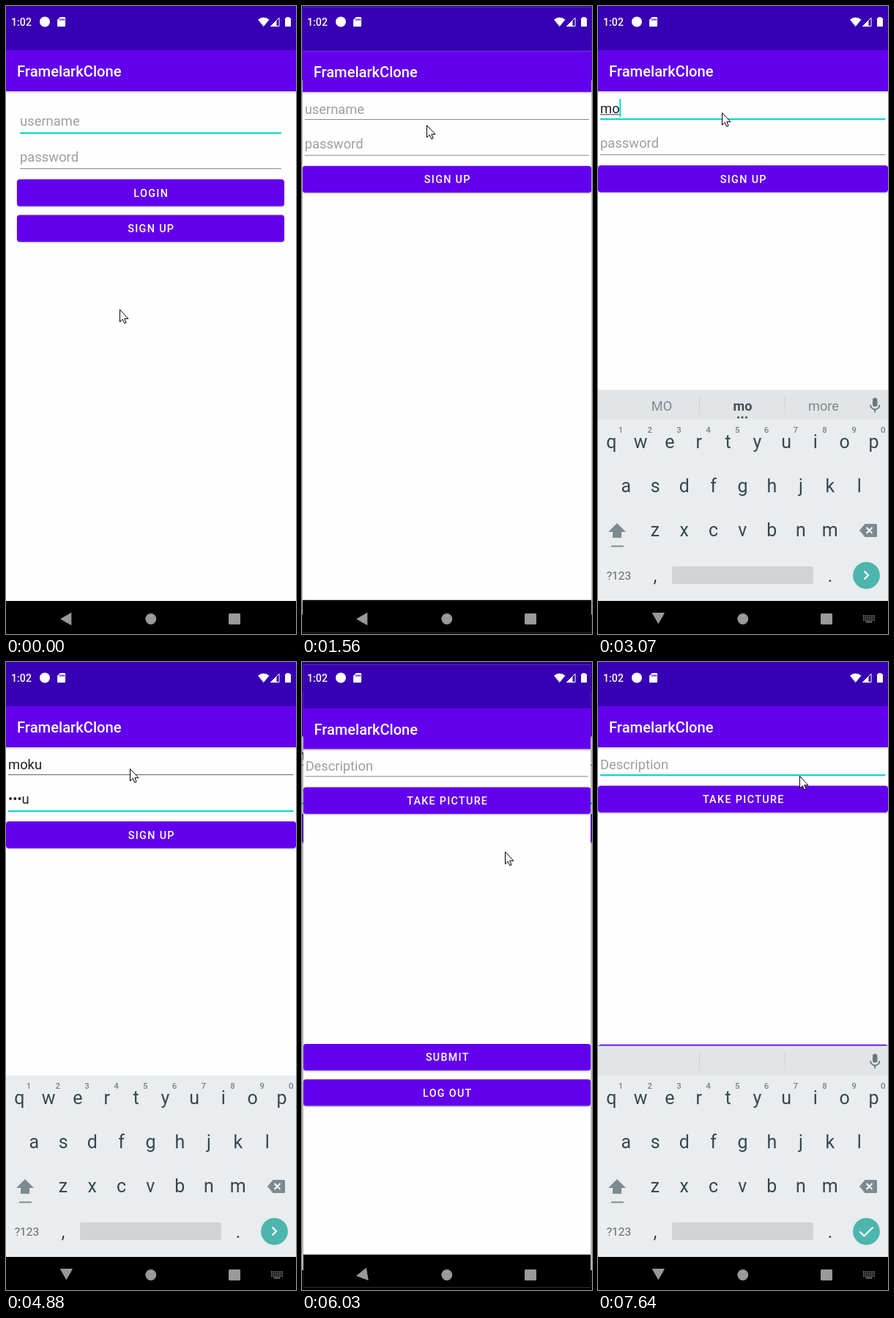
Write an HTML page with a canvas that moves like this. It is 396 by 855 pixels and loops after 8000 ms.

```html
<!DOCTYPE html>
<html lang="en">
<head>
<meta charset="utf-8">
<title>Sign up flow</title>
<style>
html, body { margin: 0; width: 100%; height: 100%; overflow: hidden; background: #000; }
canvas { display: block; }
</style>
</head>
<body>
<canvas id="stage" width="396" height="855"></canvas>
<script>
const W = 396, H = 855, LOOP = 8000;
const STEP = 127.3;   // ms between screen refreshes; all times below count these
const BLINK = 3.85;
const TEAL = '#03dac5', PURPLE = '#6200ee', INK = '#37474f', SOFT = '#75828a', NAV = '#999';
const screenCtx = document.getElementById('stage').getContext('2d');
const scratch = Object.assign(document.createElement('canvas'), { width: W, height: H }).getContext('2d');
let g = screenCtx;

const ramp = (t, start, length) => Math.min(1, Math.max(0, (t - start) / length));
const smooth = f => f * f * (3 - 2 * f);
const settle = f => 1 - (1 - f) ** 3.7;
const blink = age => Math.floor(age / BLINK) % 2 === 0;

// Each pointer move: start, end, destination.
const moves = [[2.4, 5, 178, 306], [10, 12.5, 169, 145], [38, 40, 198, 204],
  [44, 47, 277, 258], [50, 51, 235, 243], [51, 53, 275, 155]];

function pointerAt(t) {
  return moves.reduce(([x, y], [start, end, toX, toY]) => {
    const f = smooth(ramp(t, start, end - start));
    return [x + (toX - x) * f, y + (toY - y) * f];
  }, [155, 413]);
}

function typing(word, start, gap, t) {
  const count = Math.min(word.length, Math.max(0, Math.floor((t - start) / gap) + 1));
  return { value: word.slice(0, count), lastEdit: count && start + (count - 1) * gap };
}
const nameTyping = t => typing('moku', 22, 2, t);
const secretTyping = t => typing('moku', 30.6, 1.17, t);

function rect(x, y, w, h, color, r = 0) {
  g.fillStyle = color;
  g.beginPath();
  g.roundRect(x, y, w, h, r);
  g.fill();
}

function disc(x, y, r, color) {
  g.fillStyle = color;
  g.beginPath();
  g.arc(x, y, r, 0, 7);
  g.fill();
}

function shape(d, fill, stroke, width = 1) {
  const p = new Path2D(d);
  if (fill) { g.fillStyle = fill; g.fill(p); }
  if (stroke) { g.strokeStyle = stroke; g.lineWidth = width; g.stroke(p); }
}

function text(s, x, y, size, color, { weight = 400, align = 'left', spacing = 0 } = {}) {
  g.font = `${weight} ${size}px Roboto, sans-serif`;
  g.letterSpacing = spacing + 'px';
  g.textAlign = align;
  g.fillStyle = color;
  g.fillText(s, x, y);
  return g.measureText(s).width;
}

function at(x, y, draw) {
  g.save();
  g.translate(x, y);
  draw();
  g.restore();
}

// Draws as one flat layer, so overlapping parts fade together.
function group(alpha, draw) {
  if (alpha <= 0) return;
  const outer = g;
  g = scratch;
  g.clearRect(0, 0, W, H);
  draw();
  g = outer;
  g.save();
  g.globalAlpha = alpha;
  g.drawImage(scratch.canvas, 0, 0);
  g.restore();
}

function button(label, x, y, w, ripple = 0) {
  g.save();
  g.shadowColor = 'rgba(0,0,0,.3)';
  g.shadowBlur = 2;
  g.shadowOffsetY = 1.2;
  rect(x, y, w, 36.4, PURPLE, 4);
  g.restore();
  if (ripple) {
    g.save();
    g.beginPath();
    g.roundRect(x, y, w, 36.4, 4);
    g.clip();
    disc(198, y + 18, ripple * 200, 'rgba(255,255,255,.22)');
    g.restore();
  }
  text(label, x + w / 2 + .8, y + 23.5, 14.4, '#fff', { weight: 500, align: 'center', spacing: 1.32 });
}

function field(x, w, baseline, line, { hint, value = '', focus, caret, composing }) {
  const width = value && text(value, x, baseline, 18.4, '#212121');
  if (!value) text(hint, x, baseline, 18.4, '#9e9e9e');
  if (composing && value) rect(x, baseline + 1.5, width, 1, '#333');
  if (focus) rect(x, line, w, 2, TEAL);
  else rect(x, line, w, 1, value ? '#666' : '#8a8a8a');
  if (caret) rect(x + width - .3, baseline - 19.5, 2, 25, TEAL);
}

function frame(content) {
  rect(0, 0, W, H, '#fefefe');
  const fade = g.createLinearGradient(0, 116, 0, 119);
  fade.addColorStop(0, 'rgba(0,0,0,.22)');
  fade.addColorStop(1, 'rgba(0,0,0,0)');
  rect(0, 116, W, 3, fade);
  rect(0, 0, W, 60, '#3700b3');
  rect(0, 60, W, 56, PURPLE);
  text('FramelarkClone', 15, 96, 20.2, '#fff', { weight: 500 });
  content();
  rect(0, 810, W, 45, '#000');
}

function loginScreen(t) {
  frame(() => {
    field(19, 357, 163, 172, { hint: 'username', focus: true, caret: blink(t - 2) });
    field(19, 357, 211.5, 221, { hint: 'password' });
    button('LOGIN', 15, 236, 365);
    button('SIGN UP', 15, 284.5, 365, ramp(t, 8, 2));
  });
}

function signupScreen(t) {
  const inName = t >= 15 && t < 29, inSecret = t >= 29;
  const name = nameTyping(t), secret = secretTyping(t);
  frame(() => {
    field(3, 389.5, 145.8, 153, {
      hint: 'username', value: name.value, focus: inName, composing: inName,
      caret: inName && blink(t - (name.lastEdit || 15))
    });
    field(3, 389.5, 193, 202, {
      hint: 'password', value: secret.value.replace(/.(?=.)/g, '•'), focus: inSecret,
      caret: inSecret && blink(t - (secret.lastEdit || 29))
    });
    button('SIGN UP', 0, 217, W, t < 44 && ramp(t, 40, 2.5));
  });
}

function postScreen(t) {
  frame(() => {
    field(3, 389.5, 145.8, 153, { hint: 'Description', focus: t >= 55, caret: t >= 55 && blink(Math.max(0, t - 56)) });
    button('TAKE PICTURE', 0, 168.4, W);
    button('SUBMIT', 0, 520.7, W);
    button('LOG OUT', 0, 569.4, W);
  });
}

function zoomed(scale, draw) {
  g.save();
  g.translate(W / 2, H / 2);
  g.scale(scale, scale);
  g.translate(-W / 2, -H / 2);
  g.beginPath();
  g.rect(0, 0, W, H);
  g.clip();
  draw();
  g.restore();
}

function transition(p, from, to) {
  if (p < 1) {
    zoomed(1 + .05 * p, from);
    rect(0, 0, W, H, `rgba(0,0,0,${.3 * p})`);
  }
  if (p > 0) zoomed(.85 + .15 * p, to);
}

function suggestions(word) {
  rect(0, 522.5, W, 40.5, '#e1e5e8');
  for (const x of [138, 255]) rect(x, 532, 1, 24, '#cdd2d5');
  if (word) {
    const guess = ['me', 'more', 'mock', 'mocha'][word.length - 1];
    [word.toUpperCase(), word, guess].forEach((s, i) => text(s, 87 + 110.5 * i, 551, 18.2,
      i === 1 ? '#455057' : '#7d888e', { weight: i === 1 ? 700 : 400, align: 'center' }));
    for (const x of [191.5, 197, 202.5]) disc(x, 560, 1.6, '#455057');
  }
  rect(375, 533.5, 6.5, 12, '#6a767c', 3.2);
  shape('M372 543a6.2 6.2 0 0 0 12.5 0M378.2 549v4.5', null, '#6a767c', 1.8);
}

function keyboard(t) {
  const posting = t >= 46;
  rect(0, 563, W, 247, '#e9edf0');
  if (posting) suggestions('');
  else if (t < 29) suggestions(nameTyping(t).value);
  ['qwertyuiop', 'asdfghjkl', 'zxcvbnm'].forEach((row, r) => [...row].forEach((key, i) => {
    text(key, [18.3, 38.3, 78][r] + 39.8 * i, 602 + 60.2 * r, 25, INK, { align: 'center' });
    if (!r) text((i + 1) % 10, 31 + 39.8 * i, 581, 11.5, SOFT, { weight: 500, align: 'center' });
  }));
  shape('M26 704L38 716H32V724H20V716H14Z', '#7d8a90');
  rect(18, 734.5, 17, 2, '#7d8a90');
  shape('M357 714L364.5 705H379.5Q381 705 381 706.5V721.5Q381 723 379.5 723H364.5Z', '#7d8a90');
  shape('M366.5 710l8 8m0-8l-8 8', null, '#fff', 2);
  text('?123', 28.5, 781, 15.5, '#5f6b70', { align: 'center' });
  text(',', 78, 784, 25, INK, { align: 'center' });
  text('.', 317, 784, 25, INK, { align: 'center' });
  rect(101, 763, 193, 24, '#d0d4d7', 3);
  disc(366.5, 775.3, 18.4, '#4db6ac');
  shape(posting ? 'M357.5 775.5l6 6l12-12' : 'M363.5 769.5l5.5 5.5l-5.5 5.5', null, '#fff', 2.2);
}

function statusIcons() {
  text('1:02', 7, 27, 14.2, '#fff', { weight: 500 });
  disc(53, 21.5, 7, '#fff');
  shape('M74 15H80Q81 15 81 16V27Q81 28 80 28H71Q70 28 70 27V19Z', '#fff');
  for (const x of [73.5, 76, 78.5]) rect(x, 17, 1.2, 3, '#3700b3');
  shape('M351.7 28L344 18.5Q351.7 12.5 359.5 18.5Z', '#fff');
  shape('M361.5 27.5L373 16V27.5Z', null, '#fff');
  shape('M361 28L369.5 19.5V28Z', '#fff');
  rect(381, 16.3, 8, 11.7, '#fff', 1);
  rect(383, 15, 4, 2, '#fff');
}

function navIcons(turn, keyboardOpen) {
  at(82.4, 834.5 - 1.5 * turn, () => {
    g.rotate(-turn * Math.PI / 2);
    shape('M-7.5 0L6.5 -8V8Z', NAV, NAV, 1);
  });
  disc(197.8, 834.5, 7.4, NAV);
  rect(304, 827, 16, 15, NAV, 1.5);
  if (!keyboardOpen) return;
  for (let i = 0; i < 18; i++) rect(362 + i % 6 * 2.8, 829.5 + Math.floor(i / 6) * 2.8, 1.7, 1.7, '#8c8c8c');
  rect(365.5, 837.8, 9, 1.5, '#8c8c8c');
}

function draw(t) {
  if (t < 45) transition(settle(ramp(t, 10, 3.14)), () => loginScreen(t), () => signupScreen(t));
  else transition(settle(ramp(t, 45.3, 3.14)), () => signupScreen(t), () => postScreen(t));

  const shown = t < 46 ? ramp(t, 16.46, 1.54) : ramp(t, 56.46, 1.54);
  const turn = ramp(t, 17, 2) - ramp(t, 45.2, 2) + ramp(t, 57, 2);
  group(shown, () => at(0, 288 * (1 - shown), () => keyboard(t)));
  statusIcons();
  navIcons(turn, shown > 0);

  const [x, y] = pointerAt(t);
  at(Math.round(x) + .5, Math.round(y) + .5, () =>
    shape('M0 0V16.5L3.8 13L6.3 18.6L8.7 17.6L6.3 12.2H11.5Z', '#fff', '#000'));
}

function loop(now) {
  draw(Math.floor(now % LOOP / STEP));
  requestAnimationFrame(loop);
}
requestAnimationFrame(loop);
</script>
</body>
</html>
```
